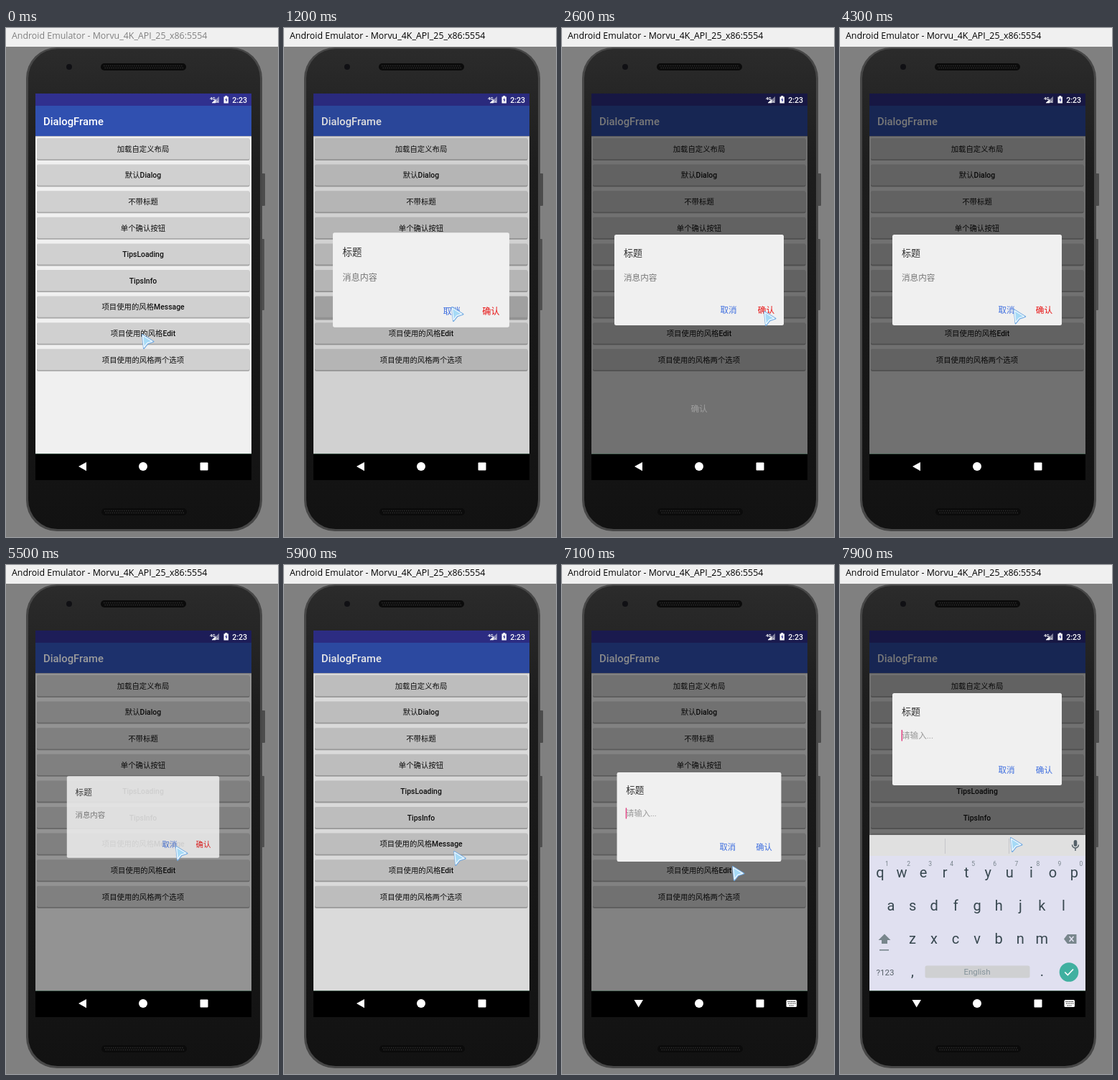
An HTML page that plays this animation: 379 px wide and 707 px high, repeating every 8000 ms.

```html
<!DOCTYPE html>
<html lang="zh">
<head>
<meta charset="utf-8">
<title>Dialog demo</title>
<style>
  html, body { margin: 0; width: 100%; height: 100%; overflow: hidden; background: #808080; }
  svg { display: block; }
  text { font-family: Roboto, "Noto Sans CJK SC", "Noto Sans CJK", sans-serif; white-space: pre; }
</style>
</head>
<body>
<svg id="stage" width="379" height="707" viewBox="0 0 379 707"></svg>
<script>
const LOOP = 8000, STEP = 100;

// Markup helpers
const rect = (x, y, w, h, fill, more = '') =>
  `<rect x="${x}" y="${y}" width="${w}" height="${h}" fill="${fill}" ${more}/>`;
const path = (d, fill, more = '') => `<path d="${d}" fill="${fill}" ${more}/>`;
const group = (id, body, more = '') => `<g id="${id}" ${more}>${body}</g>`;
const label = (x, baseline, size, str, fill, more = '') =>
  `<text x="${x}" y="${baseline}" font-size="${size}" fill="${fill}" ${more}>${str}</text>`;
const midLabel = (x, baseline, size, str, fill, more = '') =>
  label(x, baseline, size, str, fill, `text-anchor="middle" ${more}`);

const speaker = (x, y) =>
  rect(x, y, 119, 10, '#0b0b0b', 'rx="5"') +
  `<path d="M${x + 4} ${y + 3.5}h111m0 3h-111" stroke="#2c2c2c" stroke-width="1.5" stroke-dasharray="1.5 1.5" fill="none"/>`;

const phone = () => `
  <defs><linearGradient id="body" x2="0" y2="1">
    <stop offset="0" stop-color="#2b2b2b"/><stop offset=".25" stop-color="#1d1d1d"/><stop offset="1" stop-color="#121212"/>
  </linearGradient></defs>` +
  rect(356, 202, 5, 45, '#4c4c4c', 'rx="1"') +
  rect(356, 293, 4, 99, '#505050', 'rx="1"') +
  rect(28, 27, 329, 672, '#474747', 'rx="43"') +
  rect(31, 29, 323, 667, 'url(#body)', 'rx="41"') +
  '<circle cx="88" cy="54" r="4" fill="#101014"/>' +
  speaker(132, 49) + speaker(133, 667);

const buttonNames = ['加载自定义布局', '默认Dialog', '不带标题', '单个确认按钮', 'TipsLoading', 'TipsInfo',
  '项目使用的风格Message', '项目使用的风格Edit', '项目使用的风格两个选项'];

const listButton = (name, i) => {
  const y = 153 + i * 36.6;
  return rect(43, y + 1, 296.5, 30, '#a8a8a8', `id="shade${i}" rx="2"`) +
    rect(43, y, 296.5, 29.2, '#d0d0d0', `id="button${i}" rx="2"`) +
    midLabel(191, y + 18.8, 10.4, name, '#101010', 'font-weight="500"');
};

const appScreen = () =>
  rect(41, 91, 301, 501, '#f0f0f0') +
  rect(41, 91, 301, 17, '#30308f') +
  rect(41, 149, 301, 2, '#b8b8c0') +
  rect(41, 108, 301, 42, '#3050b0') +
  label(52, 134.5, 14.8, 'DialogFrame', '#fff', 'font-weight="500"') +
  buttonNames.map(listButton).join('');

const statusIcons = () =>
  label(284, 100, 6.2, '4G', '#fff', 'font-weight="700"') +
  path('M297 95V104H287Z', '#fff', 'fill-opacity=".45"') +
  path('M292 99.5V104H287ZM293 101l3 3m0-3l-3 3', '#fff', 'stroke="#fff" stroke-width=".6"') +
  path('M303.5 95.5h1.7v-1.3h3v1.3h1.7v9h-6.4Z', '#fff') +
  path('M307.3 96.5l-2 3.8h1.3v3l2-3.9h-1.3Z', '#30308f') +
  label(315.2, 103.8, 10.6, '2:23', '#fff', 'font-weight="500"');

// Dialog content is laid out from its own top-left corner.
const dialog = (height, content, buttonY, confirmColor) =>
  rect(0, 0, 236, height, '#f0f0f0', 'rx="2.5"') +
  label(13, 30, 13, '标题', '#303030') + content +
  label(147.5, buttonY, 11.6, '取消', '#3f6fdf') +
  label(199.8, buttonY, 11.6, '确认', confirmColor);

const messageBody = label(13, 64.4, 11.6, '消息内容', '#757575');
const editBody = label(13, 63.2, 11.6, '请输入...', '#999') + rect(12.6, 51, 1.4, 15.5, '#e0387c', 'id="caret"');

const letterRow = (letters, x, y) =>
  [...letters].map((c, i) => midLabel(x + i * 30.05, y, 20, c, '#37474f')).join('');

const keyboard = () =>
  rect(41, 375, 301, 30, '#e0e0e0') +
  rect(41, 404, 301, 188, '#e0e0f0') +
  path('M146.5 380v21M235.5 380v21', 'none', 'stroke="#c6c6ca"') +
  rect(325.7, 382, 4.6, 9, '#546068', 'rx="2.3"') +
  path('M323.5 388.5a4.5 4.5 0 0 0 9 0M328 393v4', 'none', 'stroke="#546068" stroke-width="1.5"') +
  [...'1234567890'].map((n, i) => midLabel(65.5 + i * 30.05, 417.5, 8.5, n, '#78848c')).join('') +
  letterRow('qwertyuiop', 56, 434) + letterRow('asdfghjkl', 71, 480) + letterRow('zxcvbnm', 101, 526) +
  path('M62 512.5l8.5 8.5h-4.5v5h-8v-5h-4.500Z', '#78868c') + rect(55, 534, 13, 1.6, '#78868c') +
  path('M312 519.500l5-6.500h12.500v13h-12.500Z', '#78868c') +
  path('M319.500 516l6 7m0-7l-6 7', 'none', 'stroke="#e0e0f0" stroke-width="1.600"') +
  midLabel(63, 569.5, 11.500, '?123', '#566068') +
  midLabel(101, 571, 20, ',', '#37474f') + midLabel(281.5, 571, 20, '.', '#37474f') +
  rect(118.5, 556.5, 146, 17, '#cfd0d2', 'rx="2.500"') +
  midLabel(191, 569, 11.500, 'English', '#84929a') +
  '<circle cx="319" cy="565.5" r="13.3" fill="#40b0a0"/>' +
  path('M313.300 565.500l4 4l7.700-8', 'none', 'stroke="#fff" stroke-width="1.700"');

const navBar = () =>
  rect(41, 591, 301, 37, '#000') + rect(41, 591, 301, 1, '#4c6658') +
  path('M112 603V615.200L101 609.100Z', '#fff', 'id="navBack"') +
  path('M100.500 604H113L106.700 614.500Z', '#fff', 'id="navDown"') +
  '<circle cx="191" cy="609" r="6" fill="#fff"/>' + rect(270.500, 603.500, 11, 11, '#fff', 'rx="1"') +
  group('navKeys', rect(312.500, 604, 14.500, 10, '#fff', 'rx="1.500"') +
    path('M314.500 606.500h11m0 2.500h-11M316.500 612h6.500', 'none', 'stroke="#000" stroke-width="1.200" stroke-dasharray="1.300 1"'));

const pointer = () =>
  path('M1 1L16.500 10.500L8.500 13.300L3 20Z', '#6fa8e0', 'stroke="#6fa8e0" stroke-width="2" stroke-linejoin="round"') +
  path('M1.500 2L15 10.300L8 12.500L3.200 18.500Z', '#a6daf6', 'stroke="#eef8ff" stroke-width="1.400" stroke-linejoin="round"');

document.getElementById('stage').innerHTML =
  rect(0, 0, 379, 707, '#808080') + rect(0, 0, 379, 26, '#f0f0f0') +
  label(8, 15.3, 12.4, 'Android Emulator - Morvu_4K_API_25_x86:5554', '#000',
    'id="windowTitle" style="font-family:\'Open Sans\',sans-serif"') +
  phone() +
  `<svg x="41" y="91" width="301" height="501" viewBox="41 91 301 501">` +
    appScreen() + rect(41, 91, 301, 501, '#000', 'id="dim"') + statusIcons() +
    group('message', dialog(126, messageBody, 109.300, '#e81010')) +
    group('edit', dialog(128, editBody, 111.300, '#3f6fdf')) +
    midLabel(191, 532.5, 11.6, '确认', '#a0a0a0', 'id="toast"') +
    group('keyboard', keyboard()) +
  '</svg>' + navBar() + group('pointer', pointer());

const $ = id => document.getElementById(id);
const set = (id, name, value) => $(id).setAttribute(name, value);
const show = (id, visible) => set(id, 'visibility', visible ? 'visible' : 'hidden');

// Linear interpolation through [time, value] points.
function track(points, t) {
  const next = points.findIndex(p => p[0] > t);
  if (next === 0) return points[0][1];
  if (next < 0) return points[points.length - 1][1];
  const [t0, a] = points[next - 1], [t1, b] = points[next];
  return a + (b - a) * (t - t0) / (t1 - t0);
}

const EDIT_OPEN = 6800, MESSAGE_OPEN = 1000;
const openScale = [[100, .8], [200, 1.042], [300, .97], [400, 1]];
const openAlpha = [[0, 0], [100, .8], [200, 1]];
const openDim = [[0, 0], [100, .04], [200, .13], [300, .46], [400, .53]];
const closeScale = [[5300, 1], [5400, .97], [5500, .9], [5700, .9], [5800, .7]];
const closeAlpha = [[5300, 1], [5400, .95], [5500, .855], [5700, .855], [5800, .3], [5900, 0]];
const closeDim = [[5200, 1], [5500, .735], [5700, .735], [5800, .35], [6000, 0]];
const toastAlpha = [[2400, 0], [2600, 1], [3200, 1], [3500, 0]];
const pointerX = [[0, 189], [200, 205], [400, 231], [500, 235], [700, 233], [1600, 233], [1700, 237], [1900, 237],
  [2300, 281], [3600, 281], [4400, 236], [5700, 236], [6500, 237]];
const pointerY = [[0, 425], [200, 433], [300, 428], [500, 402], [700, 387], [1600, 387], [1700, 388], [1900, 388],
  [2300, 393], [3600, 393], [4400, 390], [5700, 390], [6500, 418], [7300, 418], [7500, 411], [7600, 411], [7900, 378]];
const editCenter = [[7200, 350], [7300, 335], [7400, 285], [7500, 242]];
const keyboardDrop = [[7100, 217], [7200, 190], [7300, 120], [7400, 45], [7500, 0]];

function placeDialog(id, height, centerY, scale, alpha) {
  set(id, 'transform', `translate(191 ${centerY}) scale(${scale}) translate(-118 ${-height / 2})`);
  set(id, 'opacity', alpha);
}

function pressButton(index, since) {
  const raised = since >= 0 && since < 300;
  set('shade' + index, 'height', raised ? 32 : 30);
  set('button' + index, 'fill', since >= 100 && since < 300 ? '#b8b8b8' : '#d0d0d0');
}

function draw(time) {
  const t = Math.floor(time % LOOP / STEP) * STEP;
  const messageAge = t - MESSAGE_OPEN, editAge = t - EDIT_OPEN;

  set('windowTitle', 'fill', t < 600 ? '#808080' : '#000');
  set('dim', 'opacity', track(openDim, messageAge) * track(closeDim, t) + track(openDim, editAge));
  pressButton(6, messageAge);
  pressButton(7, editAge);

  placeDialog('message', 126, 350, track(openScale, messageAge) * track(closeScale, t),
    track(openAlpha, messageAge) * track(closeAlpha, t));
  placeDialog('edit', 128, track(editCenter, t), track(openScale, editAge), track(openAlpha, editAge));
  set('caret', 'opacity', t >= 7400 && t < 7800 ? 0 : 1);
  set('toast', 'opacity', track(toastAlpha, t));

  const typing = t >= 7000;
  show('navBack', !typing);
  show('navDown', typing);
  show('navKeys', typing);
  set('keyboard', 'transform', `translate(0 ${track(keyboardDrop, t)})`);
  set('pointer', 'transform', `translate(${track(pointerX, t)} ${track(pointerY, t)})`);
}

const start = performance.now();
function tick() {
  draw(performance.now() - start);
  requestAnimationFrame(tick);
}
tick();
</script>
</body>
</html>
```
